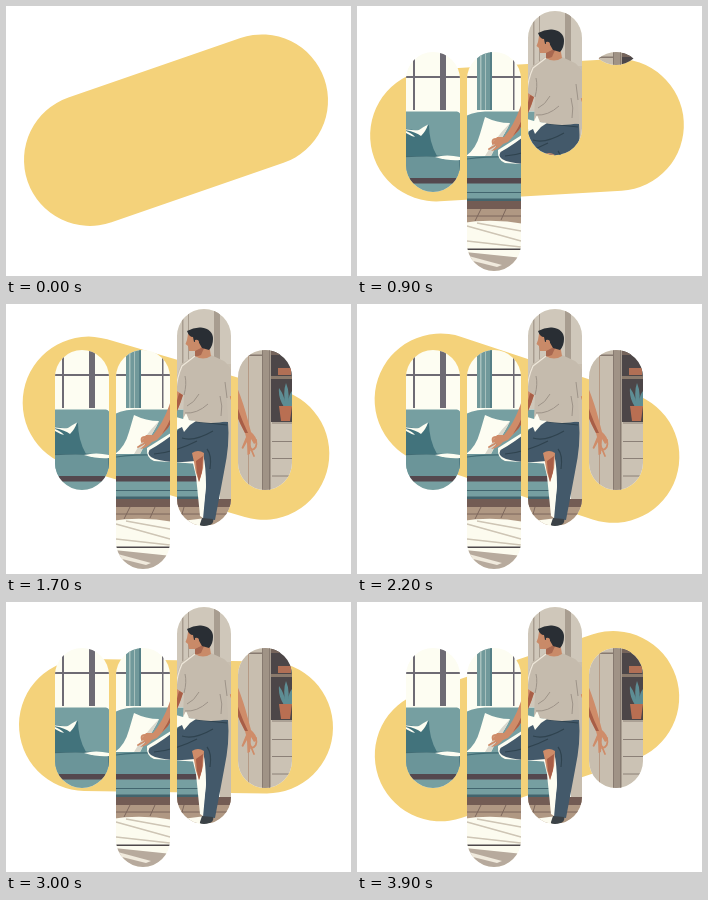
Animation, 345 px wide and 270 px high, one loop 4 s. Source, as an HTML page:

```html
<!DOCTYPE html>
<html lang="en">
<head>
<meta charset="utf-8">
<title>Balance at home</title>
<style>
html, body { margin: 0; width: 100%; height: 100%; overflow: hidden; background: #fff; }
svg { display: block; width: 345px; height: 270px; }
</style>
</head>
<body>
<svg viewBox="0 0 345 270">
  <defs><clipPath id="slots"><path id="mask"/></clipPath></defs>
  <line id="pill" x1="79" y1="124.200" x2="261" y2="124.200" stroke="#f4d27a" stroke-width="132" stroke-linecap="round"/>
  <g clip-path="url(#slots)">
    <!-- room -->
    <path fill="#fdfdf2" d="M45 0H290V270H45Z"/>
    <path fill="#6e6b74" d="M56 46h2v58h-2zM49 70h115v2H49zM83 46h6v58h-6zM156 46h1.500v58h-1.500z"/>
    <path fill="#71999b" d="M120 46h15v58h-15z"/>
    <path fill="#a7c0bd" d="M123 46h1.500v58h-1.500zM128 46h1v58h-1z"/>
    <path fill="#557f86" d="M133 46h2v58h-2z"/>
    <!-- sofa -->
    <path fill="#769fa1" d="M45 105.500H100Q104 106 105 113Q112 106 128 105.500H205V196H45Z"/>
    <path fill="#6b9599" d="M45 152Q76 147 103 153L110 150H205V172H45Z"/>
    <path fill="none" stroke="#416c74" stroke-width="1.200" d="M45 151Q80 148 103 153V172M110 153Q140 149 200 152"/>
    <path fill="#fdfdf2" d="M78 151Q90 148 103 151V154Q92 155 78 151Z"/>
    <path fill="#54484e" d="M45 172H205V177.500H45Z"/>
    <path fill="#42656e" d="M103 186H205V187H103ZM103 192.500H205V195H103Z"/>
    <path fill="#42737c" d="M45 122L62 125Q67 120 72 119Q72 136 80 150H45Z"/>
    <path fill="#fdfdf2" d="M47 123Q58 125 62 124Q66 121 71 118.500Q69 125 64 130Q59 126 47 124ZM49 125Q56 128 58 131Q54 130 49 127Z"/>
    <path fill="#fdfdf2" d="M128 111Q140 117 153 117Q147 130 140 138L134 150H109Q119 143 123 128Z"/>
    <path fill="#d9d8cd" d="M153 117Q147 130 140 138L134 150H128Q138 132 153 117Z"/>
    <!-- floor and rug -->
    <path fill="#b09883" d="M103 195H230V221H103Z"/>
    <path fill="#735c54" d="M103 195H230V203H103Z"/>
    <path fill="none" stroke="#7d675c" d="M103 210H230M124 203L118 215M149 203L144 214M178 203L175 214"/>
    <path fill="#fcfbef" d="M105 217Q135 212 168 218L200 214V268H105Z"/>
    <path fill="none" stroke="#cec5b5" stroke-width="1.300" d="M110 220L164 235M120 217L164 225M110 235L164 241"/>
    <path fill="#4d474a" d="M108 242.500H166V244H108Z"/>
    <path fill="#b7aa9d" d="M108 246L166 252V268H108Z"/>
    <path fill="#f0eadd" d="M108 249L145 259L140 261L112 254Z"/>
    <!-- wall panel -->
    <path fill="#cfc7ba" d="M168 0H230V105H168Z"/>
    <path fill="#a89d90" d="M176 0H177.500V60H176ZM182 0H183V60H182ZM208 0H214V70H208Z"/>
    <path fill="#c8beaf" d="M214 60H232V195H214ZM230 40H265V190H230Z"/>
    <path fill="none" stroke="#b59a86" d="M242.500 46V186"/>
    <path fill="#a09386" d="M257 46H264V190H257Z"/>
    <path fill="#877a70" d="M230 50.500H257V52H230ZM256 46H257V190H256ZM263 46H264.500V190H263Z"/>
    <!-- shelf -->
    <path fill="#4c4648" d="M265 44H290V118H265Z"/>
    <path fill="#75645b" d="M265 44H290V51H265Z"/>
    <path fill="#b06f55" d="M272 64H285V71H272Z"/>
    <path fill="#8a7a6c" d="M265 72H290V75H265Z"/>
    <path fill="#5d8d94" d="M278 103Q272 94 273 84Q278 91 279 98Q277 87 280 79Q284 88 282 98Q283 89 287 86V103Z"/>
    <path fill="#b96f52" d="M273 102H286L284 117H275Z"/>
    <path fill="#cbc2b4" d="M265 118H290V190H265Z"/>
    <path fill="none" stroke="#8b8077" d="M266 119H290M266 137.500H290M266 154.500H290M266 172H290"/>
    <!-- arms -->
    <g fill="#cf8c69">
      <path d="M169 85L177 91Q172 108 162 124L151 136L146 138Q140 145 134 145L140 140L135 137L140 131L147 131Q157 119 163 102Z"/>
      <path d="M222 87L231 83Q238 101 241 113L245 128Q250 132 251 138L248 140L245 135L244 150L241.500 151L241 138L237 145L235.500 144L240 133L239 129Q229 111 222 87Z"/>
    </g>
    <path fill="#a85e47" d="M173 89L177 91Q172 108 162 124L156 130Q168 112 173 89ZM224 88L227 87Q231 106 242 129L239 129Q229 111 224 88Z"/>
    <g fill="none" stroke="#cf8c69" stroke-width="1.800" stroke-linecap="round">
      <path d="M141 138L132 143M141 133Q134 132 136 138M250 136Q252 145 245 146M243 140L248 152"/>
    </g>
    <!-- legs -->
    <path fill="#fdfdf2" d="M168 127L141 144Q140 154 148 157L187 159.500L190 172L194 212L200 216L206 160Z"/>
    <path fill="#43596a" d="M181 114L222 118Q224 140 218 168L209 216L197 215L200 182Q200 162 197 150L189 157Q165 160 149 155Q140 152 143.500 146Q158 138 171 127Z"/>
    <path fill="none" stroke="#2f434f" stroke-width="1.200" d="M148 150Q170 148 191 137M176 134Q188 138 207 127M201 145Q206 151 204 165M184 117L221 121"/>
    <path fill="#cf8c69" d="M186 149Q192 145 198 149L197 166L193 178Q189 168 188 158Z"/>
    <path fill="#a85e47" d="M190 157L197 152L196 168L193 178Q190 168 190 157Z"/>
    <path fill="#fdfdf2" d="M197 164L200 182L197 207L192 190Z"/>
    <path fill="#3b4247" d="M196 214L207 215Q209 220 201 222Q193 223 194 220Z"/>
    <!-- shirt and head -->
    <path fill="#c5bbad" d="M188 51Q182 56 175 60Q170 73 169 86L178 91L177 114Q200 122 222 117L221 94L232 88Q228 65 218 57L205 51Z"/>
    <path fill="#fdfdf2" d="M170 113L177 115L180 109L183 116L190 117L184 121L178 128L176 123L170 126Z"/>
    <path fill="none" stroke="#eee7da" stroke-width="1.200" d="M189 52Q180 59 176 62Q171 73 170 86"/>
    <path fill="none" stroke="#9d9388" d="M178 91Q181 80 179 72M179 109Q191 110 202 100M181 102Q188 99 193 90M221 94L219 78M215 112Q217 102 214 92"/>
    <path fill="#c98a68" d="M182 30L181 36L179.500 40L182 42L183 47L189 47V52Q197 57 205 52L203 40L199 27Z"/>
    <path fill="#a86850" d="M189 47L199 42L195 51Q190 53 189 52Z"/>
    <path fill="#292e34" d="M181 27Q188 23 195 23.500Q207 25 207 35Q207 42 203 46L196 44L192 37L188 38L187 33Q183 33 181 27Z"/>
    <path fill="#c98a68" d="M189 36Q193 35 193 39Q191 44 189 41Z"/>
  </g>
</svg>
<script>
const LOOP = 4000, STEP = 100, LAG = 30;
const RADIUS = 27, TILT = 19.1, RAMP = 0.25;
const STAGGER = 250, REVEAL = 610;
// centre x, top, height
const slots = [[76, 46, 140], [137, 46, 219], [198, 5, 217], [259, 46, 140]];
const pill = document.getElementById('pill');
const mask = document.getElementById('mask');

const ease = x => (1 - Math.cos(Math.PI * Math.min(1, Math.max(0, x)))) / 2;

// Speeds up, runs evenly, slows down
function glide(x) {
  if (x > 0.5) return 1 - glide(1 - x);
  return (x < RAMP ? x * x / (2 * RAMP) : x - RAMP / 2) / (1 - RAMP);
}

// Overlap of a slot with a copy of itself sliding down into place
function slotPath([cx, top, full], i, t) {
  const h = full * ease((t - i * STAGGER) / REVEAL);
  if (h < 0.1) return '';
  const cap = Math.min(RADIUS, h / 2);
  const w = Math.sqrt(RADIUS ** 2 - (RADIUS - cap) ** 2);
  const arc = `A${RADIUS} ${RADIUS} 0 0 1`;
  return `M${cx - w} ${top + cap}${arc} ${cx + w} ${top + cap}` +
    `V${top + h - cap}${arc} ${cx - w} ${top + h - cap}Z`;
}

function draw(time) {
  const t = time - LAG;
  const swing = Math.abs(t) / (LOOP / 2);
  const angle = TILT * (2 * glide(swing > 1 ? 2 - swing : swing) - 1);
  pill.setAttribute('transform', `rotate(${angle} 170 124.2)`);
  mask.setAttribute('d', slots.map((s, i) => slotPath(s, i, t)).join(''));
}

const origin = performance.now();
function tick() {
  const t = Math.max(0, performance.now() - origin) % LOOP;
  draw(Math.floor(t / STEP) * STEP);
  requestAnimationFrame(tick);
}
draw(0);
requestAnimationFrame(tick);
</script>
</body>
</html>
```
